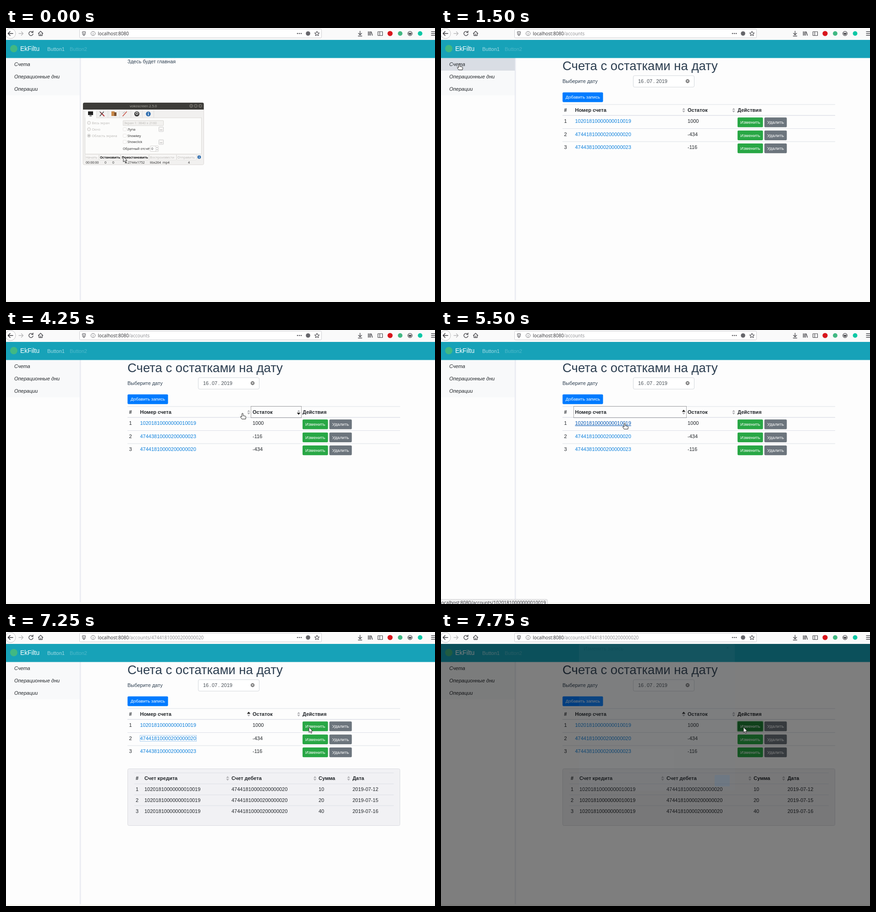
Animation of 936x598 px, one loop 8000 ms. Source, as an HTML page:

```html
<!DOCTYPE html>
<html lang="ru">
<head>
<meta charset="utf-8">
<title>Счета</title>
<style>
  html, body { margin: 0; width: 100%; height: 100%; overflow: hidden; background: #fdfdfd; }
  svg { display: block; width: 936px; height: 598px; }
  text { font: 11px "Liberation Sans", Arial, sans-serif; fill: #212529; white-space: pre; }
  .b { font-weight: bold; }
  .i { font-style: italic; }
  .h1 { font-size: 27.5px; fill: #2c3e50; }
  .brand { font-size: 13.75px; fill: #fff; }
  .nav { fill: #a2dae3; }
  .off { fill: #4fb8c9; }
  .body { fill: #2c3e50; }
  .date { fill: #495057; }
  .btn { font-size: 9.63px; fill: #fff; text-anchor: middle; }
  .link { fill: #0d80dc; }
  .hover { fill: #0056b3; text-decoration: underline; }
  .url { font: 10px "Open Sans", "Noto Sans", sans-serif; fill: #2a2a2e; }
  .path { fill: #8a8a8e; }
  .v { font: 7.2px "Open Sans", "Noto Sans", sans-serif; fill: #222; }
  .vb { font-weight: bold; font-size: 7px; fill: #111; }
  .vd { fill: #b9b7b4; }
  .vt { fill: #b5b2aa; text-anchor: middle; font-size: 7.6px; }
</style>
</head>
<body>
<svg id="stage" viewBox="0 0 936 598"></svg>
<script>
const STEP = 250, LOOP = 8000;
const A = '10201810000000010019', B = '47441810000200000020', C = '47443810000200000023';
const BALANCE = { [A]: '1000', [B]: '-434', [C]: '-116' };

// Pointer tip: time, x, y
const POINTER = [
  [0, 256, 281], [500, 403, 169], [750, 403, 169], [1250, 40, 79], [1750, 40, 79],
  [2500, 578, 178], [4000, 574, 179], [4250, 516, 182], [4500, 420, 180], [5000, 412, 181],
  [5500, 401, 204], [6000, 401, 204], [6500, 399, 231], [6750, 399, 231],
  [7250, 661, 208], [7500, 661, 208], [7750, 660, 208]
];

const rect = (x, y, w, h, fill, r = 0, more = '') =>
  `<rect x="${x}" y="${y}" width="${w}" height="${h}" rx="${r}" fill="${fill}" ${more}/>`;
const text = (x, y, s, cls = '') => `<text x="${x}" y="${y}" class="${cls}">${s}</text>`;
const circle = (x, y, r, fill, more = '') => `<circle cx="${x}" cy="${y}" r="${r}" fill="${fill}" ${more}/>`;
const fill = (d, color) => `<path d="${d}" fill="${color}"/>`;
const stroke = (d, color = '#4a4a4f', w = 1.4) =>
  `<path d="${d}" fill="none" stroke="${color}" stroke-width="${w}" stroke-linecap="round" stroke-linejoin="round"/>`;
const rule = (x1, x2, y, h = 1) => rect(x1, y, x2 - x1, h, '#dcdfe6');
const dotted = (x, y, w, h, color) =>
  rect(x + .5, y + .5, w - 1, h - 1, 'none', 0, `stroke="${color}" stroke-dasharray="1 1"`);

function sorter(x, y, dir) {
  const tri = (s, on) => {
    const w = on ? 3.8 : 3.2, base = y + s;
    return fill(`M${x - w} ${base}h${2 * w}l${-w} ${s * (on ? 4.6 : 4)}z`, on ? '#1b1b1b' : '#b0b0b4');
  };
  return tri(-1, dir === 'asc') + tri(1, dir === 'desc');
}

function button(x, y, w, label, color, focus) {
  const ring = focus ? rect(x - 1.5, y - 1.5, w + 3, 24.3, '#a5d8b1', 3) : '';
  return ring + rect(x, y, w, 21.3, color, 2.2) + text(x + w / 2, y + 14, label, 'btn');
}

function toolbar(path) {
  return rect(0, 0, 936, 26, '#fafafa')
    + circle(10, 12, 11, '#fdfdfd', 'stroke="#c4c4c6"')
    + stroke('M15 12H5M9 7.5L4.5 12L9 16.5', '#38383d', 1.6)
    + stroke('M28 12H37M33.5 8L37.5 12L33.5 16', '#b8b8ba')
    + stroke('M58 9A4.6 4.6 0 1 0 59 13M59 6.5V9.8H55.5')
    + stroke('M70.5 12L75.5 7L80.5 12M72 11.5V16.5H79V11.5M75.5 16V13')
    + rect(160.5, 2.5, 528, 19, '#fff', 2, 'stroke="#cfcfd2"')
    + stroke('M166.5 8.5L170 7.5L173.5 8.5C173.5 13 172.5 15 170 16.5C167.5 15 166.5 13 166.5 8.5ZM170 9.5V14', '#5c5c61', 1.2)
    + circle(190, 12, 4.6, 'none', 'stroke="#77777b"') + stroke('M190 11.5V14.2M190 9.6V9.7', '#77777b', 1.1)
    + text(200.5, 15.5, `localhost:8080<tspan class="path">${path}</tspan>`, 'url')
    + [636, 640, 644].map(x => circle(x, 12, 1.3, '#55555a')).join('')
    + circle(659, 12, 4.8, '#66666b')
    + stroke('M678.5 7L680 10.6L683.6 10.8L680.8 13.1L681.8 16.7L678.5 14.7L675.2 16.7L676.2 13.1L673.4 10.8L677 10.6Z', '#4a4a4f', 1.1)
    + stroke('M772.5 7V14.5M769 11.5L772.5 15L776 11.5M768.5 17.5H776.5')
    + stroke('M790.5 8V16M793 8V16M795.5 8V16M797 8.5L799.5 16')
    + stroke('M811.5 8H821.5V16.5H811.5ZM815.5 8V16.5', '#4a4a4f', 1.2)
    + circle(838, 12, 5.6, '#d8151c') + circle(860, 12, 5, '#41b883')
    + circle(881.5, 12, 4.6, 'none', 'stroke="#4a4a4f" stroke-width="1.4"')
    + fill('M878.5 10.5h6v1.5a3 3 0 0 1-6 0z', '#4a4a4f')
    + circle(903.5, 12, 5, '#0cc8a6')
    + stroke('M928 8H936M928 12H936M928 16H936');
}

function shell(hoverItem) {
  const items = ['Счета', 'Операционные дни', 'Операции'];
  return rect(0, 26, 936, 572, '#fdfdfd')
    + rect(0, 65, 161, 82, '#f8f9fa') + rect(161, 65, 3, 529, '#f1f2f6') + rect(161, 65, 1, 529, '#e1e3ec')
    + rect(0, 594, 936, 4, '#f8f8f5')
    + (hoverItem ? rect(0, 65, 161, 28, '#d9dde4') : '')
    + items.map((s, i) => text(18, 82.8 + 27.3 * i, s, 'i')).join('')
    + rect(0, 26, 936, 39.5, '#17a2b8')
    + circle(17, 45, 8, '#41b883')
    + text(31, 50, 'EkFiltu', 'brand') + text(90, 49.8, 'Button1', 'nav') + text(139, 49.8, 'Button2', 'off');
}

function accounts(s) {
  const order = s.sort === 'bal-asc' ? [B, C, A] : s.sort === 'bal-desc' ? [A, C, B] : [A, B, C];
  const [col, dir] = (s.sort || '').split('-');
  let out = text(265, 91.7, 'Счета с остатками на дату', 'h1')
    + text(265, 120.3, 'Выберите дату', 'body')
    + rect(419.5, 104, 133, 25, '#fff', 3, 'stroke="#d3d7dc"')
    + [[430, '16'], [444, '.'], [449, '07'], [463, '.'], [469.5, '2019']].map(([x, v]) => text(x, 120.3, v, 'date')).join('')
    + circle(538, 116, 4.2, '#777') + stroke('M536.5 114.5L539.5 117.5M539.5 114.5L536.5 117.5', '#fff', 1.1)
    + button(265.2, 140.4, 88.3, 'Добавить запись', '#007bff')
    + rule(265, 860, 166.5) + rule(265, 860, 190, 1.4) + rule(265, 860, 219) + rule(265, 860, 247.5)
    + [[268.5, '#'], [292.5, 'Номер счета'], [538, 'Остаток'], [647, 'Действия']].map(([x, v]) => text(x, 183.3, v, 'b')).join('')
    + sorter(529.5, 179.5, col === 'num' && dir) + sorter(638.5, 179.5, col === 'bal' && dir);
  if (s.focus === 'bal') out += dotted(534, 166, 111, 26, '#555');
  if (s.focus === 'num') out += dotted(289, 166, 247, 26, '#555');
  order.forEach((id, i) => {
    const y = 207.3 + 28.35 * i, pressed = s.focus === 'edit' && i === 0;
    out += text(268.5, y, i + 1) + text(292.5, y, id, s.hover === id ? 'hover' : 'link')
      + text(538, y, BALANCE[id])
      + button(647, y - 12, 55.5, 'Изменить', pressed ? '#1e8035' : '#28a745', pressed)
      + button(705.5, y - 12, 49, 'Удалить', '#6c757d');
    if (s.focus === id) out += dotted(292, Math.round(y) - 11, 124, 14, '#4d9be0');
  });
  return out;
}

function entries(id) {
  const [credit, sums] = id === A ? [C, [300, 700, 70]] : [A, [10, 20, 40]];
  const dates = ['2019-07-12', '2019-07-15', '2019-07-16'];
  const cols = [283, 302, 492, 682, 756];
  const row = (cells, y, cls) => cells.map((v, i) => text(cols[i], y, v, cls)).join('');
  return rect(265.5, 298.5, 594, 124, '#f1f1f4', 3, 'stroke="#dadbe0"')
    + [307, 331, 355, 378.5].map(y => rule(280, 846, y)).join('')
    + row(['#', 'Счет кредита', 'Счет дебета', 'Сумма', 'Дата'], 323.3, 'b')
    + [483.5, 674, 747.5].map(x => sorter(x, 319.5)).join('')
    + dates.map((d, i) => row([i + 1, credit, id, sums[i], d], 347.4 + 23.7 * i)).join('');
}

function recorder() {
  const t = (x, y, s, cls = '') => text(x, y, s, 'v ' + cls);
  const more = y => rect(333.5, y, 10, 10, '#f6f5f4', 1, 'stroke="#ccc"') + t(335.5, y + 7, '...');
  const radio = (y, s, on) => circle(181, y, 3.4, '#f6f5f4', 'stroke="#c8c6c3"')
    + (on ? circle(181, y, 1.7, '#aaa') : '') + t(187.5, y + 2.6, s, 'vd');
  const check = (y, s) => rect(255.5, y - 3.5, 7, 7, '#fff', 1, 'stroke="#e4e2df"') + t(265, y + 2.6, s);
  return rect(168, 163, 263.5, 135.5, '#f1f0ef', 3, 'stroke="#dddbd8"')
    + fill('M168 178V166q0-3 3-3H428.5q3 0 3 3V178z', '#3d3c39')
    + t(299.5, 172.8, 'vokoscreen 2.5.0', 'vt')
    + [404, 414, 424].map(x => circle(x, 170, 3.4, '#5c5a55', 'stroke="#83807a" stroke-width=".8"')).join('')
    + stroke('M402.5 170H405.5M412.7 168.7H415.3V171.3H412.7ZM422.8 168.8L425.2 171.2M425.2 168.8L422.8 171.2', '#2b2a28', .8)
    + rect(172.5, 196, 254, 79, '#fcfcfb', 0, 'stroke="#dddbd8"')
    + rect(173, 179, 24, 18, '#fcfcfb') + [197, 222, 247, 272, 297, 322].map(x => rect(x, 180, .8, 16, '#dddbd8')).join('')
    + rect(179, 182, 11, 8, '#222') + rect(182, 191, 5, 1.5, '#444')
    + stroke('M207 185L214 192', '#b3282d', 1.8) + stroke('M213 183L205 192', '#444', 1.5) + stroke('M205 183L207 185', '#444', 1.5)
    + rect(230, 182, 7, 10, '#c98a4a') + rect(236, 184, 5, 8, '#7a5230')
    + stroke('M255 192L263 183', '#c9564a', 1.7) + stroke('M255 186L259 183', '#bbb', 1.2)
    + circle(285.5, 187.5, 5.5, '#3b3b3b') + circle(285.5, 186.5, 3, '#ddd') + circle(285.5, 186.5, 1.6, '#222')
    + circle(310.5, 187.5, 5.2, '#2d6cae') + rect(309.8, 186.5, 1.6, 4, '#fff') + rect(309.8, 184, 1.6, 1.5, '#fff')
    + radio(207, 'Весь экран') + radio(221, 'Окно') + radio(235, 'Область экрана', true)
    + rect(255.5, 202, 88, 11, '#f3f2f0', 1, 'stroke="#d8d6d3"') + t(257.5, 210, 'Экран 1: 3840 x 2160', 'vd')
    + check(221, 'Лупа') + check(235, 'Showkey') + check(248.5, 'Showclick') + more(216) + more(244)
    + t(255, 266, 'Обратный отсчёт') + rect(314.5, 257.5, 18, 12, '#fff', 1, 'stroke="#d3d1ce"') + t(317, 266, '0')
    + rect(326, 258, .8, 11, '#d3d1ce') + fill('M328 262h3l-1.5-2zM328 265h3l-1.5 2z', '#888')
    + [[172, 30], [203, 46], [250, 61], [312, 59], [372, 43]].map(([x, w]) =>
      rect(x + .5, 276, w, 12, '#f8f7f6', 1, 'stroke="#dddbd8" stroke-width=".7"')).join('')
    + t(174, 284.5, 'Начать', 'vd') + t(205, 284.5, 'Остановить', 'vb') + t(252.5, 284.5, 'Приостановить', 'vb')
    + t(314, 284.5, 'Воспроизвести', 'vd') + t(374, 284.5, 'Отправить', 'vd')
    + circle(421.5, 281.7, 3.8, '#2d6cae') + rect(421, 281, 1.1, 2.8, '#fff') + rect(421, 279.3, 1.1, 1, '#fff')
    + [[174, '00:00:00'], [215, '0'], [232, '0'], [259.5, 'A:2744x1752'], [314, 'libx264  mp4'], [397, '4']]
      .map(([x, s]) => t(x, 295.8, s)).join('');
}

function status(path, w) {
  return rect(-3, 588, w + 3, 14, '#f1f1f1', 2, 'stroke="#c9c9cc"') + text(-2, 598.7, 'localhost:8080' + path, 'url');
}

function modal(opacity) {
  return `<g opacity="${opacity}">` + rect(301, 26, 340, 320, '#7b8794', 3)
    + text(311, 40, 'Изменить запись') + text(622, 38, '×') + rect(597, 312, 33, 25, '#007bff', 2) + '</g>';
}

function pointer(t, hand) {
  const i = POINTER.findLastIndex(p => p[0] <= t);
  const [t0, x0, y0] = POINTER[i], [t1, x1, y1] = POINTER[i + 1] || [t0 + 1, x0, y0];
  const k = (t - t0) / (t1 - t0);
  const shape = hand
    ? 'M-1.3 1.2q0-1.4 1.3-1.4t1.3 1.4V5l4.6.9q1.5.4 1.5 1.9l-.6 4.5H-1.5L-4.3 8q-.6-1.4.8-1.7l2.2 1.2z'
    : 'M0 0V11.2L2.6 8.9L4.5 13L6.4 12.1L4.6 8.2L8.2 8z';
  return `<path transform="translate(${x0 + (x1 - x0) * k} ${y0 + (y1 - y0) * k})" d="${shape}" fill="#fff" stroke="#222" stroke-linejoin="round"/>`;
}

// Latest value of a [time, value] list
const at = (list, t) => list.findLast(e => e[0] <= t)[1];

function draw(t) {
  const open = at([[0, ''], [6000, A], [6750, B]], t);
  const page = t >= 1500;
  const s = {
    sort: at([[0, ''], [2750, 'bal-asc'], [3500, 'bal-desc'], [4750, 'num-asc']], t),
    focus: at([[0, ''], [2750, 'bal'], [4750, 'num'], [6000, A], [6750, B], [7500, 'edit']], t),
    hover: at([[0, ''], [5500, A], [6250, ''], [6500, B], [7000, '']], t)
  };
  const shade = at([[0, 0], [7500, .035], [7750, .5]], t);
  const hand = at([[0, false], [1250, true], [2000, false], [2500, true], [5250, false], [5500, true], [7000, false]], t);
  const path = page ? '/accounts' + (open && '/' + open) : '';

  let out = shell(t >= 1250 && t < 2000);
  out += page ? accounts(s) : text(265, 77.3, 'Здесь будет главная', 'body');
  if (open) out += entries(open);
  if (t < 750) out += recorder();
  if (t >= 1250 && t < 1500) out += status('/accounts', 114);
  if (t >= 5500 && t < 6000) out += status('/accounts/' + A, 232);
  if (shade) out += rect(0, 26, 936, 572, '#000', 0, `opacity="${shade}"`);
  if (t >= 7750) out += modal(.08);
  return out + toolbar(path) + pointer(t, hand);
}

const stage = document.getElementById('stage');
let shown = -1;
function tick() {
  const t = Math.floor(performance.now() % LOOP / STEP) * STEP;
  if (t !== shown) stage.innerHTML = draw(shown = t);
  requestAnimationFrame(tick);
}
tick();
</script>
</body>
</html>
```
